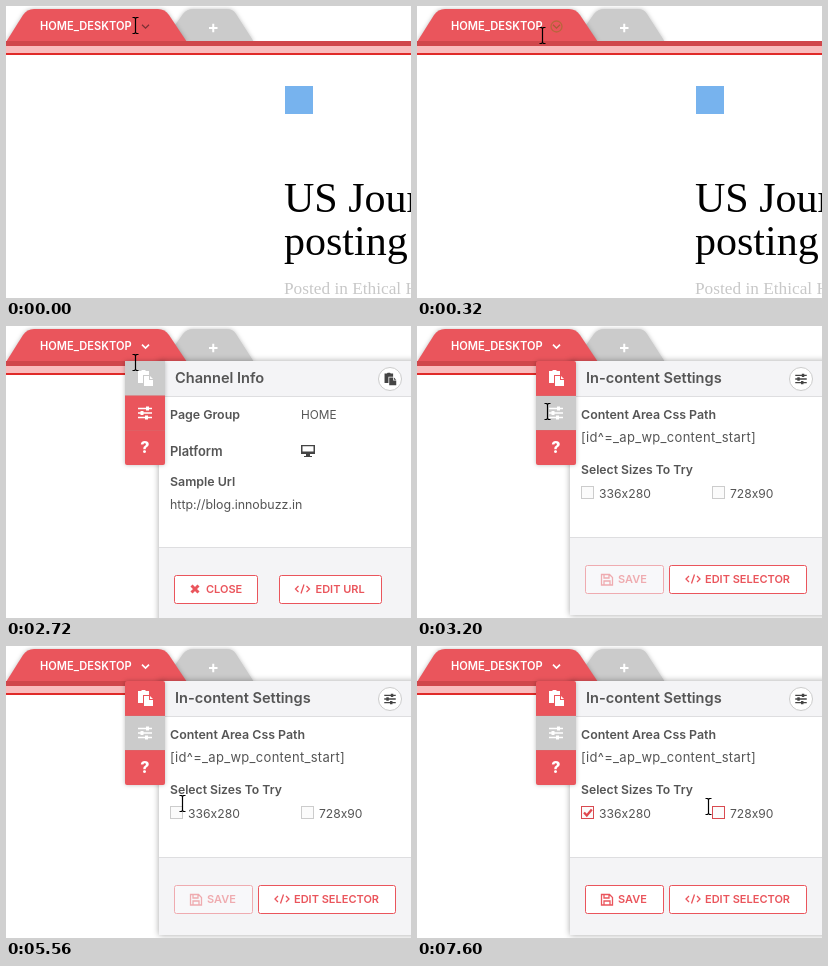
An HTML page for the animation above (8 s loop, 405 by 292 pixels).

```html
<!DOCTYPE html>
<html lang="en">
<head>
<meta charset="utf-8">
<title>Channel settings</title>
<style>
  html, body { margin: 0; width: 100%; height: 100%; overflow: hidden; background: #fff; }
  svg { display: block; width: 405px; height: 292px; }
  text { font-family: Inter, Roboto, sans-serif; fill: #555; white-space: pre; }
  .serif { font-family: "Liberation Serif", "Noto Serif", serif; fill: #000; }
  .tab { font-size: 11.1px; font-weight: 600; fill: #fff; }
  .title { font-size: 14.6px; font-weight: 600; }
  .label { font-size: 12.4px; font-weight: 600; }
  .value { font-size: 12.4px; }
  .button rect { fill: #fff; stroke: #ea555c; }
  .button text { font-size: 11px; font-weight: 600; fill: #ea555c; }
  .line { fill: none; stroke: #ea555c; stroke-width: 1.3; }
  .shadow { filter: drop-shadow(0 0 3px rgba(0, 0, 0, .35)); }
  .soft { filter: drop-shadow(0 0 2px rgba(0, 0, 0, .25)); }
  .check { fill: #fbfbfb; stroke: #ccc; }
  .check.hot { stroke: #d94a50; }
</style>
</head>
<body>
<svg viewBox="0 0 405 292">
  <defs>
    <g id="paste">
      <path d="M-7-7h3l1-1h3l1 1h3v4h-6v8h-5z" fill="currentColor"/>
      <path d="M-1-2h5v4h4v6h-9z" fill="currentColor"/>
      <path d="M5-2l3 3h-3z" fill="currentColor"/>
    </g>
    <g id="sliders" fill="none" stroke="currentColor">
      <path d="M-7-4.5h14M-7 0h14M-7 4.5h14" stroke-width="1.6"/>
      <path d="M2.5-6.5v4M-3-2v4M1.5 2.5v4" stroke-width="3"/>
    </g>
    <path id="code" class="line" d="M-4-3l-3 3 3 3M4-3l3 3-3 3M1.5-4.5l-3 9"/>
  </defs>

  <g id="page">
    <rect x="279" y="80" width="28" height="28" fill="#77b3ee"/>
    <text class="serif" x="278" y="206" font-size="42">US Journal</text>
    <text class="serif" x="278" y="249" font-size="42">posting</text>
    <text class="serif" x="278" y="288" font-size="17.3" style="fill:#c8c8c8">Posted in Ethical H</text>
  </g>

  <path class="soft" fill="#cbcbcb" d="M157 36L177 8Q181 3 187 3H221Q227 3 230 8L248 36z"/>
  <path d="M203 22h8.500M207.250 17.750v8.500" stroke="#fff" stroke-width="2"/>
  <path class="soft" fill="#ea555c" d="M0 36L17 9Q21 3 28 3H152Q159 3 163 9L181 36z"/>
  <rect y="35" width="405" height="5" fill="#d0474b"/>
  <rect y="40" width="405" height="7" fill="#f9bcbd"/>
  <rect y="47" width="405" height="2" fill="#e02a28"/>
  <text class="tab" x="34" y="24">HOME_DESKTOP</text>
  <circle id="ring" cx="139.500" cy="20.500" r="5.500" fill="none" stroke="#b8663c" stroke-width="1.300"/>
  <path id="chevron" d="M136 18.700l3.500 3.400 3.500-3.400" fill="none"/>

  <g id="panel">
    <g id="info">
      <rect class="shadow" x="153" y="35" width="260" height="266" fill="#fff"/>
      <path d="M153 35h252v35H153zM153 221h252v80H153z" fill="#f4f4f6"/>
      <path d="M153 70.500h252M153 221.500h252" stroke="#dedee0"/>
      <text class="title" x="169" y="57">Channel Info</text>
      <circle cx="384" cy="53" r="11.500" fill="#fff" stroke="#ccc"/>
      <use href="#paste" transform="translate(384 53) scale(.78)" color="#444"/>
      <text class="label" x="164" y="93">Page Group</text>
      <text class="value" x="295" y="93" style="font-size:11.800px">HOME</text>
      <text class="label" x="164" y="130" style="font-size:12.900px">Platform</text>
      <path d="M295 119h14v9h-5v2h2v1h-8v-1h2v-2h-5zm1.500 1.300v5.200h11v-5.200z" fill="#444" fill-rule="evenodd"/>
      <text class="label" x="164" y="160">Sample Url</text>
      <text class="value" x="164" y="183">http://blog.innobuzz.in</text>
      <g class="button">
        <rect x="168.500" y="249.500" width="83" height="28" rx="2"/>
        <path class="line" d="M185.500 259.500l7 7m0-7l-7 7" style="stroke-width:3"/>
        <text x="200" y="267">CLOSE</text>
        <rect x="273.500" y="249.500" width="102" height="28" rx="2"/>
        <use href="#code" x="296.500" y="263"/>
        <text x="309.500" y="267">EDIT URL</text>
      </g>
    </g>

    <g id="content">
      <rect class="shadow" x="153" y="35" width="260" height="254" fill="#fff"/>
      <path d="M153 35h252v35H153zM153 211h252v78H153z" fill="#f4f4f6"/>
      <path d="M153 70.500h252M153 211.500h252" stroke="#dedee0"/>
      <text class="title" x="169" y="57">In-content Settings</text>
      <circle cx="384" cy="53" r="11.500" fill="#fff" stroke="#ccc"/>
      <use href="#sliders" transform="translate(384 53) scale(.82)" color="#444"/>
      <text class="label" x="164" y="93">Content Area Css Path</text>
      <text class="value" x="164" y="116" style="font-size:13px;letter-spacing:.3px">[id^=_ap_wp_content_start]</text>
      <text class="label" x="164" y="148" style="font-size:12.200px">Select Sizes To Try</text>
      <rect id="first" class="check" x="164.500" y="160.500" width="12" height="12"/>
      <path id="tick" d="M167 166.500l2.800 3 5-6" fill="none" stroke="#e0484e" stroke-width="2.300"/>
      <text class="value" x="182" y="172" style="font-size:12.200px">336x280</text>
      <rect id="second" class="check" x="295.500" y="160.500" width="12" height="12"/>
      <text class="value" x="313" y="172" style="font-size:12.100px">728x90</text>
      <g class="button" id="save">
        <rect x="168.500" y="239.500" width="78" height="28" rx="2"/>
        <path class="line" d="M184.500 248.500h8l3 3v7.500h-11zM187 248.500v3.500h5v-3.500M187 259v-4h6v4"/>
        <text x="201" y="257">SAVE</text>
      </g>
      <g class="button">
        <rect x="252.500" y="239.500" width="137" height="28" rx="2"/>
        <use href="#code" x="276" y="253"/>
        <text x="288" y="257">EDIT SELECTOR</text>
      </g>
    </g>

    <rect class="soft" x="119" y="35" width="40" height="104" rx="2" fill="#ea555c"/>
    <rect id="active" x="119" width="40" fill="#cbcbcb"/>
    <path d="M119 69.500h40M119 104.500h40" stroke="#d9666a" opacity=".6"/>
    <use href="#paste" x="139" y="52" color="#fff"/>
    <use href="#sliders" x="139" y="87" color="#fff"/>
    <text x="139" y="127" text-anchor="middle" style="fill:#fff;font-size:16px;font-weight:800">?</text>
  </g>

  <path id="cursor" d="M-3-8h2l1 1 1-1h2M0-7V7M-3 8h2l1-1 1 1h2" fill="none" stroke="#000" stroke-width="1.200"/>
</svg>

<script>
  const LOOP = 8000, STEP = 40;
  const OPEN = 1440, SWITCH = 3000, TICK = 6640;
  const $ = id => document.getElementById(id);

  // time, x, y of the pointer
  const path = [
    [0, 129, 19], [80, 129, 19], [320, 125, 29], [640, 130, 19],
    [1159, 130, 19], [1160, 129, 19], [2560, 129, 19],
    [2760, 129, 40], [2960, 130, 78], [3120, 130, 85], [4080, 130, 85],
    [4240, 141, 85], [4480, 176, 88], [4640, 203, 92], [4760, 216, 99],
    [4880, 218, 124], [4920, 217, 125], [5160, 207, 134],
    [5480, 180, 154], [5760, 166, 165], [7040, 166, 165],
    [7200, 190, 161], [7400, 254, 158], [7600, 291, 160], [LOOP, 291, 160]
  ];

  const clamp = v => Math.max(0, Math.min(1, v));
  const show = (id, on) => $(id).style.display = on ? "" : "none";

  function pointer(t) {
    const i = path.findIndex(p => p[0] > t);
    const [t0, x0, y0] = path[i - 1], [t1, x1, y1] = path[i];
    const k = (t - t0) / (t1 - t0);
    return [x0 + (x1 - x0) * k, y0 + (y1 - y0) * k].map(v => Math.round(v) + .5);
  }

  function draw(t) {
    const open = t >= OPEN, switched = t >= SWITCH;
    show("page", !open);
    show("panel", open);
    show("info", !switched);
    show("content", switched);
    $("active").setAttribute("y", switched ? 70 : 35);
    $("active").setAttribute("height", switched ? 34 : 35);

    $("ring").style.opacity = open ? 0 : clamp((t - 80) / 240);
    $("chevron").style.stroke = open ? "#fff" : t < 160 ? "#7a3034" : "#a85c38";
    $("chevron").style.strokeWidth = open ? 1.7 : 1.2;

    $("first").classList.toggle("hot", t >= 5680);
    $("second").classList.toggle("hot", t >= 7520);
    show("tick", t >= TICK);
    $("save").style.opacity = .45 + .55 * clamp((t - TICK) / 200);
    $("cursor").setAttribute("transform", `translate(${pointer(t)})`);
  }

  function tick() {
    const t = performance.now() % LOOP;
    draw(Math.floor(t / STEP) * STEP);
    requestAnimationFrame(tick);
  }
  tick();
</script>
</body>
</html>
```
